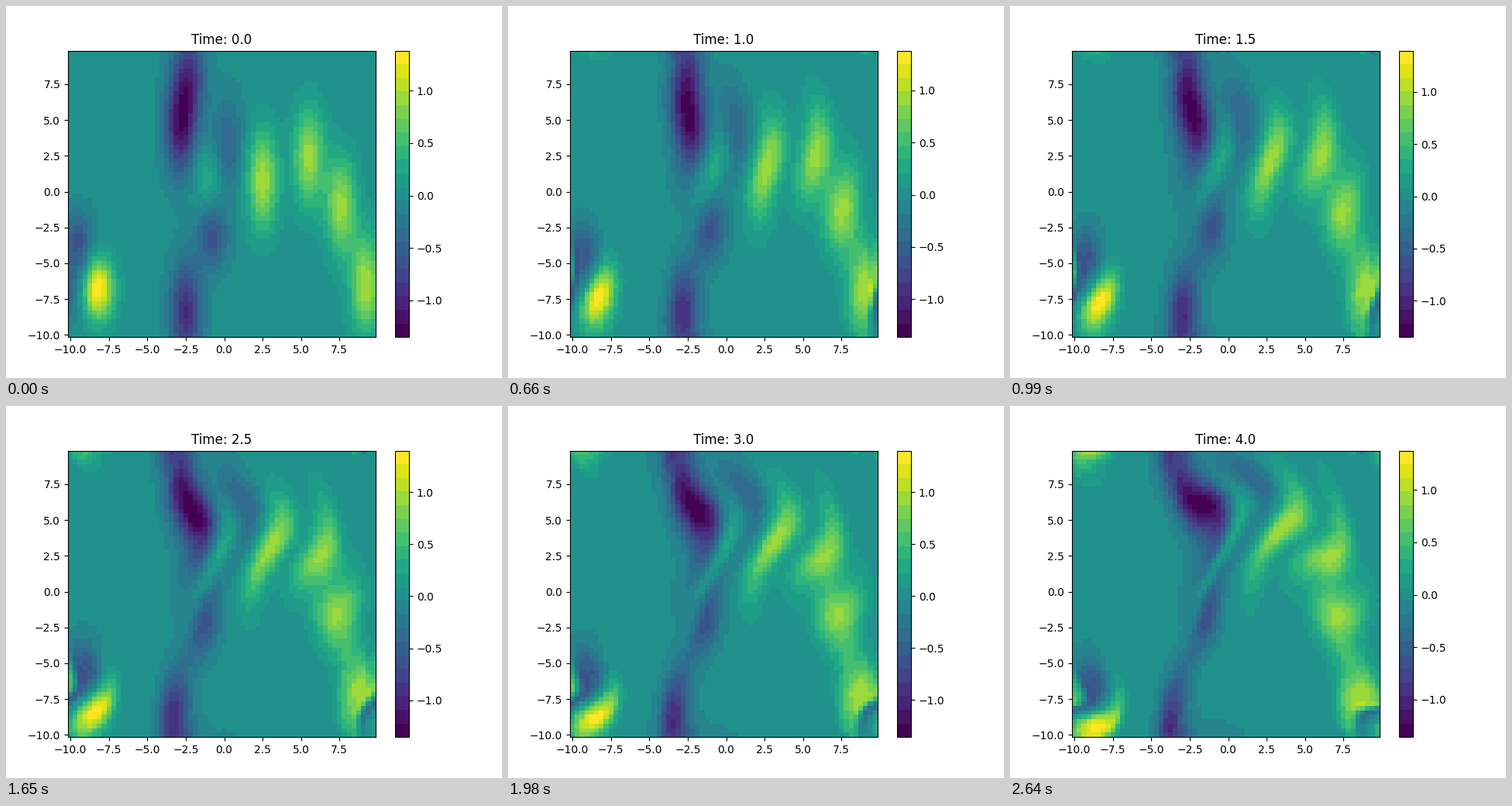
A matplotlib script that plays this animation: 640 by 480 pixels, repeating every 2.97 s.

```python
import numpy as np
import matplotlib.pyplot as plt
from matplotlib.animation import FuncAnimation

N, LENGTH, NU = 64, 20.0, 0.001
FRAMES, INTERVAL = 9, 330
DT, STEPS = 0.05, 10

# Initial Gaussian vortices by vertical stretch: (x, y, strength)
VORTICES = {
    11.5: [(2.5, 0.8, 0.98), (5.5, 2.4, 0.94), (7.6, -1.0, 0.93),
           (9.2, -6.5, 0.98), (-2.85, 4.6, -1.12), (-2.25, 8.2, -0.8),
           (0.2, 3.2, -0.46), (-2.5, -8.4, -0.98)],
    4.6: [(-8.2, -6.8, 1.41), (-1.05, 1.1, 0.35), (-0.8, -3.2, -0.64),
          (-9.5, -3.6, -0.62), (-10.1, -6.9, -0.38)],
}

grid = np.arange(N) * LENGTH / N - LENGTH / 2
X, Y = np.meshgrid(grid, grid)
k = 2 * np.pi * np.fft.fftfreq(N, LENGTH / N)
KX, KY = np.meshgrid(k, k)
K2 = KX**2 + KY**2
INV_K2 = 1 / np.where(K2 == 0, np.inf, K2)


def inverse(spectrum):
    return np.fft.ifft2(spectrum).real


def rate(w):
    """Advection by the stream function's flow, plus viscosity."""
    wh = np.fft.fft2(w)
    psi = -wh * INV_K2
    u, v = inverse(1j * KY * psi), inverse(-1j * KX * psi)
    return (-u * inverse(1j * KX * wh) - v * inverse(1j * KY * wh)
            - NU * inverse(K2 * wh))


def step(w):
    """One fourth-order Runge-Kutta step."""
    a = rate(w)
    b = rate(w + DT / 2 * a)
    c = rate(w + DT / 2 * b)
    d = rate(w + DT * c)
    return w + DT / 6 * (a + 2 * b + 2 * c + d)


def simulate():
    w = sum(strength * np.exp(-(X - x)**2 - (Y - y)**2 / stretch)
            for stretch, group in VORTICES.items()
            for x, y, strength in group)
    fields = [w]
    for _ in range(FRAMES - 1):
        for _ in range(STEPS):
            w = step(w)
        fields.append(w)
    return fields


fields = simulate()
fig, ax = plt.subplots(figsize=(6.4, 4.8), dpi=100)
mesh = ax.pcolormesh(grid, grid, fields[0], shading="nearest",
                     cmap=plt.get_cmap("viridis", 21))
fig.colorbar(mesh, ax=ax)
title = ax.set_title("Time: 0.0")


def update(i):
    mesh.set_array(fields[i])
    mesh.set_clim(fields[i].min(), fields[i].max())
    title.set_text(f"Time: {i * STEPS * DT:.1f}")
    return mesh, title


anim = FuncAnimation(fig, update, frames=FRAMES, interval=INTERVAL,
                     repeat=True, repeat_delay=0)
plt.show()
```
